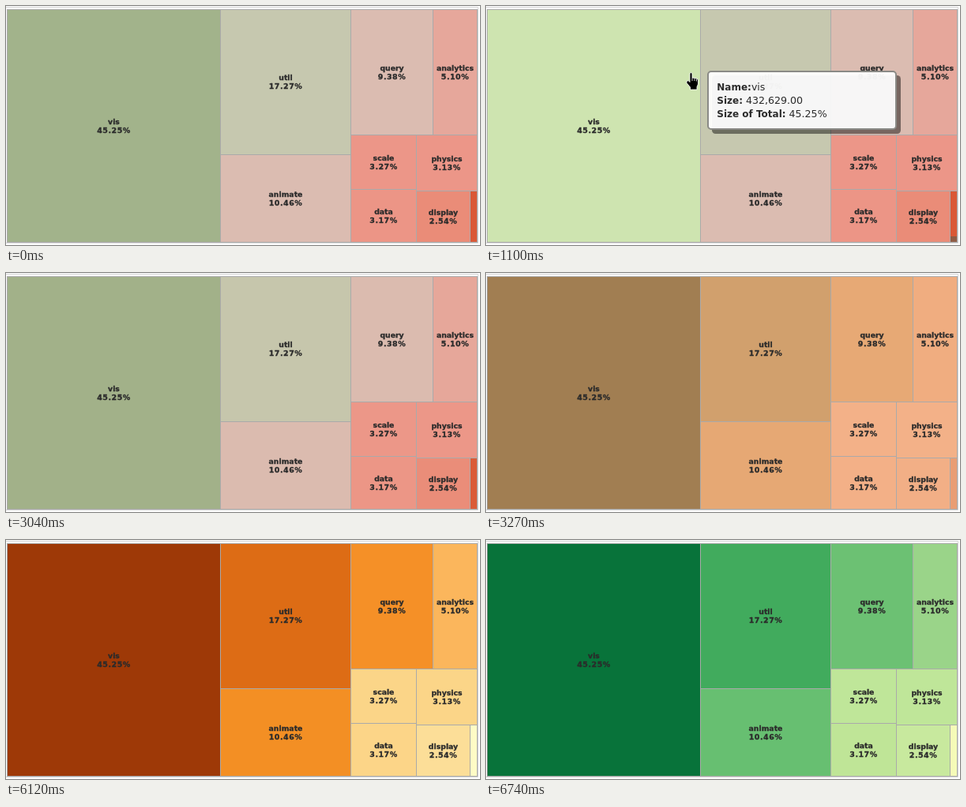
An HTML page that plays this animation: 600 by 303 pixels, repeating every 8000 ms.

```html
<!DOCTYPE html>
<html lang="en">
<head>
<meta charset="utf-8">
<title>Treemap</title>
<style>
  html, body { margin: 0; width: 100%; height: 100%; overflow: hidden; background: #fff; }
  svg { display: block; width: 600px; height: 303px; }
  text { font-family: "DejaVu Sans", Verdana, sans-serif; fill: #222; }
  .cell { stroke: #aaa; }
  .label {
    font-weight: bold; font-size: 9.3px; text-anchor: middle;
    fill: #2b2b2b; stroke: #2b2b2b; stroke-width: .3px;
  }
  .share { font-size: 9.5px; letter-spacing: .5px; }
  .tip text { font-size: 12.6px; fill: #2b2b2b; }
  .tip .key { font-weight: bold; font-size: 12px; }
</style>
</head>
<body>
<svg viewBox="0 0 600 303">
  <path d="M0 1.5H597.5V300.5H0" fill="none" stroke="#d4d4d4"/>
  <g id="cells"></g>
  <rect id="speck" x="588" y="292" width="8" height="7" fill="#8f5c45"/>
  <g id="labels"></g>
  <g id="tip" class="tip">
    <rect x="28" y="4" width="239" height="74" rx="4.5" fill="#000" fill-opacity=".46"/>
    <rect x="23" y="-1" width="238" height="73" rx="4" fill="#fff" fill-opacity=".94" stroke="#8a8a86" stroke-width="2"/>
    <text x="34.3" y="23"><tspan class="key">Name:</tspan>vis</text>
    <text x="34.3" y="40"><tspan class="key">Size:</tspan> 432,629.00</text>
    <text x="34.3" y="57"><tspan class="key">Size of Total:</tspan> 45.25%</text>
  </g>
  <g id="hand" stroke="#fff" stroke-width=".8" stroke-linejoin="round">
    <path d="M0 1.5Q1.5-.5 3 1.5V7L6 7.3 8.5 8 10.5 9.5V15L9 18.5V22H.5V19L-4 13.5V11.5L-2 10.5 0 12.5Z"/>
    <path d="M3 7V11M6 7.5V11M8.5 8.5V11.5" fill="none"/>
  </g>
</svg>
<script>
const LOOP = 8000;
// name, share, left, top, right, bottom, three theme colours
const CELLS = [
  ["vis", "45.25%", 1, 4, 271, 299, "a2b38b", "a03806", "08733a"],
  ["util", "17.27%", 271, 4, 436, 188, "c6c8af", "e06b14", "41ab5d"],
  ["animate", "10.46%", 271, 188, 436, 299, "dbbcb1", "f58e23", "67bf71"],
  ["query", "9.38%", 436, 4, 540, 163, "dbbcb1", "f78f26", "6cc173"],
  ["analytics", "5.10%", 540, 4, 596, 163, "e6a79b", "fdb65b", "9ad489"],
  ["scale", "3.27%", 436, 163, 519, 232, "ec9688", "fcd588", "bfe699"],
  ["physics", "3.13%", 519, 163, 596, 234, "ec9688", "fcd588", "bfe699"],
  ["data", "3.17%", 436, 232, 519, 299, "ec9586", "fdd588", "bfe597"],
  ["display", "2.54%", 519, 234, 587, 299, "ea8c78", "fdde98", "c8e99e"],
  ["", "", 587, 234, 596, 299, "d95836", "fffcc6", "f5fbb8"]
];
const HOVER = { start: 620, end: 1410, steps: 10, fill: "#cee4b0" };
const FADES = [{ start: 3040, end: 3650 }, { start: 6120, end: 6740 }];
const PATH = [[592, 290], [455, 212], [345, 138], [262, 80], [260, 81],
              [258, 83], [258, 84], [262, 86], [400, 172], [560, 272]];

const byId = id => document.getElementById(id);
const hand = byId("hand"), tip = byId("tip"), speck = byId("speck");

function add(parent, tag, attrs, text = "") {
  const node = document.createElementNS("http://www.w3.org/2000/svg", tag);
  for (const key in attrs) node.setAttribute(key, attrs[key]);
  node.textContent = text;
  return parent.appendChild(node);
}

const rgb = hex => [0, 2, 4].map(i => parseInt(hex.slice(i, i + 2), 16));
const mix = (a, b, p) => `rgb(${a.map((v, i) => Math.round(v + (b[i] - v) * p))})`;
const cubicInOut = p => p < .5 ? 4 * p ** 3 : 1 - 4 * (1 - p) ** 3;

const cells = CELLS.map(([name, share, left, top, right, bottom, ...themes]) => {
  const x = (left + right) / 2 + .5, y = (top + bottom) / 2;
  const rect = add(byId("cells"), "rect", {
    class: "cell", x: left + .5, y: top + .5, width: right - left, height: bottom - top
  });
  add(byId("labels"), "text", { class: "label", x, y: y - 1.7 }, name);
  add(byId("labels"), "text", { class: "label share", x, y: y + 9 }, share);
  return { rect, themes: themes.map(rgb) };
});

// Each colour change advances in nine visible steps.
function fadeAt(t, { start, end }) {
  if (t < start) return 0;
  const step = Math.min(8, Math.floor((t - start) / (end - start) * 8 + .01));
  return cubicInOut(.16 + .84 * step / 8);
}

function draw(t) {
  const first = fadeAt(t, FADES[0]), second = fadeAt(t, FADES[1]);
  for (const { rect, themes: [a, b, c] } of cells)
    rect.setAttribute("fill", second ? mix(b, c, second) : mix(a, b, first));

  const stepTime = (HOVER.end - HOVER.start) / HOVER.steps;
  const point = t < HOVER.end && PATH[Math.floor((t - HOVER.start) / stepTime + .2)];
  const inside = Boolean(point) && point[0] < 271;
  hand.style.display = point ? "" : "none";
  tip.style.display = inside ? "" : "none";
  speck.style.display = t >= HOVER.start && t < FADES[0].start ? "" : "none";
  if (!point) return;
  const place = `translate(${point})`;
  hand.setAttribute("transform", place);
  tip.setAttribute("transform", place);
  if (inside) cells[0].rect.setAttribute("fill", HOVER.fill);
}

const origin = performance.now();
function tick() {
  draw((performance.now() - origin) % LOOP);
  requestAnimationFrame(tick);
}
tick();
</script>
</body>
</html>
```
